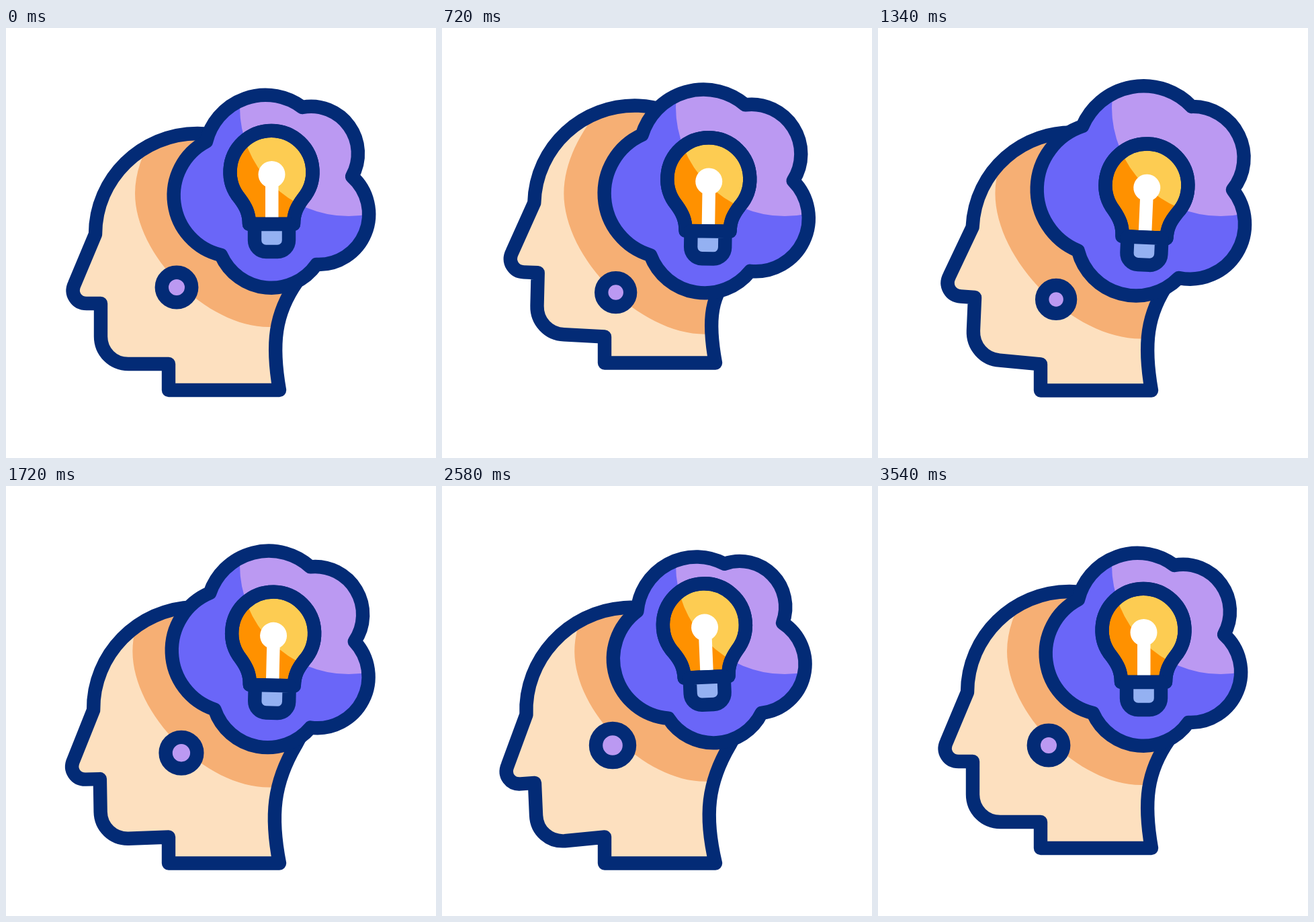
These frames come from a looping animation (640x640 px, 3600 ms). An HTML page with a canvas:

```html
<!DOCTYPE html>
<html lang="en">
<head>
<meta charset="utf-8">
<title>Idea</title>
<style>
  html, body { margin: 0; height: 100%; overflow: hidden; background: #fff; }
  canvas { display: block; width: 640px; height: 640px; }
</style>
</head>
<body>
<canvas width="640" height="640"></canvas>
<script>
const ctx = document.querySelector('canvas').getContext('2d');
const LOOP = 3600;
const NAVY = '#032b76', SKIN = '#fde0bf', TAN = '#f6af74', VIOLET = '#6a66f8',
  LILAC = '#bb99f2', AMBER = '#ff9100', YELLOW = '#fdcc52', BLUE = '#94b1f2';

// Sine ease from 0 at start to 1 at end.
function ease(t, start, end) {
  const p = Math.min(1, Math.max(0, (t - start) / (end - start)));
  return (1 - Math.cos(Math.PI * p)) / 2;
}

// Rest, first extreme, opposite extreme, rest; the delay makes a part trail behind.
function swing(t, first, second, delay, rest = 3500) {
  const turn = 1150 + delay, back = turn + 1000;
  return first * ease(t, 250, turn) + (second - first) * ease(t, turn, back)
    - second * ease(t, back, rest);
}

const headLift = t =>
  -41 * ease(t, 220, 760) + 63.5 * ease(t, 760, 1730) - 22.5 * ease(t, 2760, 3480);

const cloudShape = new Path2D(`M298 169 A91 91 0 0 1 441 118 A70 70 0 0 1 515 221
  A75 75 0 0 1 462 352 A82 82 0 0 1 320 338 A91 91 0 0 1 298 169 Z`);
const shadeShape = new Path2D(
  'M391 47 C299 47 192 154 192 246 C192 338 299 445 391 445 H600 V47 Z');
const bulbShape = new Path2D(`M362 292 C362 276 357 266 348 254 A61.5 61.5 0 1 1 442 254
  C433 266 428 276 428 292 Z`);
const socketShape = new Path2D(
  'M370 292 V316 A17 17 0 0 0 387 333 H404 A17 17 0 0 0 421 316 V292 Z');
const glowShape = circle(395.5, 218, 20);
glowShape.rect(386, 218, 19.5, 70);
const light = circle(510, 118, 162);

function circle(x, y, r) {
  const path = new Path2D();
  path.arc(x, y, r, 0, 2 * Math.PI);
  return path;
}

// Copies a shape, turned and scaled about a pivot and shifted down.
function posed(shape, x, y, { turn = 0, size = 1, drop = 0 }) {
  const path = new Path2D();
  path.addPath(shape,
    new DOMMatrix().translate(x, y + drop).rotate(turn).scale(size).translate(-x, -y));
  return path;
}

function fill(path, color) {
  ctx.fillStyle = color;
  ctx.fill(path);
}

// Fills a shape, tints the part inside another shape, then outlines it.
function paint(path, color, inner, tint) {
  fill(path, color);
  if (inner) {
    ctx.save();
    ctx.clip(path);
    fill(inner, tint);
    ctx.restore();
  }
  ctx.stroke(path);
}

// The face leans as a whole, the base only lifts, the neck bends between them.
function headPath(lift, lean) {
  const path = new Path2D();
  const face = (x, y) => [
    x + lean * (480 - y),
    y + lift + lean * (1.6 * (x - 265) - .2 * (497 - y))
  ];
  const neck = (x, y, follow) => [x + 110 * Math.min(0, lean), y + follow * lift];
  path.moveTo(...face(325, 163));
  path.quadraticCurveTo(...face(305, 157), ...face(285, 157));
  path.bezierCurveTo(...face(202, 157), ...face(133, 224), ...face(133, 307));
  path.lineTo(...face(102, 381));
  path.bezierCurveTo(...face(95, 396), ...face(105, 410), ...face(120, 410));
  path.lineTo(...face(141, 410));
  path.lineTo(...face(141, 459));
  path.bezierCurveTo(...face(141, 482), ...face(159, 500), ...face(182, 500));
  path.lineTo(242, 500 + lift);
  path.lineTo(242, 539 + lift);
  path.lineTo(407, 539 + lift);
  path.bezierCurveTo(...neck(395, 470, .9), ...neck(400, 425, .75), ...neck(433, 378, .35));
  path.lineTo(...neck(448, 350, .35));
  return path;
}

function draw(t) {
  const size = 1 + swing(t, .1, -.034, 0);
  const turn = swing(t, 9.5, -9.5, 250);
  const lean = swing(t, .05, -.075, 50, 3050);
  const earDrop = swing(t, 18, 0, 150);
  const bulbPose = { turn: .27 * turn, drop: swing(t, 21, -9.5, 50) };

  ctx.fillStyle = '#fff';
  ctx.fillRect(0, 0, 640, 640);
  ctx.strokeStyle = NAVY;
  ctx.lineWidth = 20.4;
  ctx.lineJoin = ctx.lineCap = 'round';

  paint(headPath(headLift(t), lean), SKIN, posed(shadeShape, 391, 246, { size }), TAN);
  paint(circle(254 + .62 * earDrop, 386 + earDrop, 22.2 + swing(t, -1.5, 3.5, 50)), LILAC);
  paint(posed(cloudShape, 395, 244, { turn, size }), VIOLET, light, LILAC);

  const bulb = posed(bulbShape, 395, 325, bulbPose);
  paint(bulb, AMBER, light, YELLOW);
  fill(posed(glowShape, 395, 325, bulbPose), '#fff');
  ctx.stroke(bulb);
  paint(posed(socketShape, 395, 325, bulbPose), BLUE);
}

function tick() {
  draw(performance.now() % LOOP);
  requestAnimationFrame(tick);
}
tick();
</script>
</body>
</html>
```
